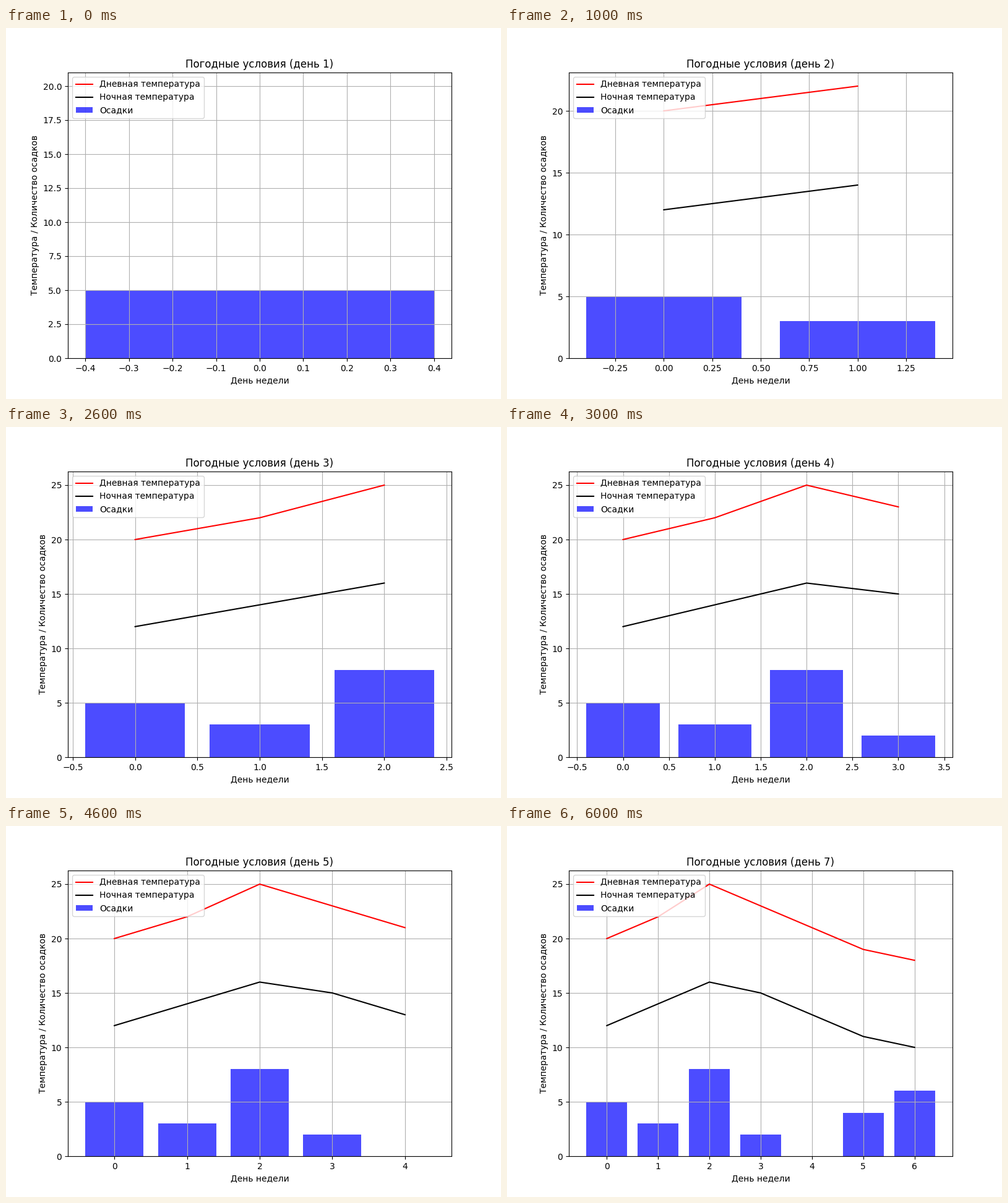
A matplotlib script that plays this animation: 800x600 px, repeating every 7 s.

```python
import matplotlib.pyplot as plt
from matplotlib.animation import FuncAnimation

DAY_TEMP = [20, 22, 25, 23, 21, 19, 18]
NIGHT_TEMP = [12, 14, 16, 15, 13, 11, 10]
RAIN = [5, 3, 8, 2, 0, 4, 6]

plt.rcParams["font.family"] = "DejaVu Sans"
fig, ax = plt.subplots(figsize=(8, 6), dpi=100)


def draw(frame):
    """Plot the week up to and including the given day."""
    count = frame + 1
    days = range(count)
    ax.clear()
    ax.plot(days, DAY_TEMP[:count], color="red", label="Дневная температура")
    ax.plot(days, NIGHT_TEMP[:count], color="black", label="Ночная температура")
    ax.bar(days, RAIN[:count], color="blue", alpha=0.7, label="Осадки")
    ax.set_xlabel("День недели")
    ax.set_ylabel("Температура / Количество осадков")
    ax.set_title(f"Погодные условия (день {count})")
    ax.legend(loc="upper left")
    ax.grid(True)


anim = FuncAnimation(fig, draw, frames=len(RAIN), init_func=lambda: draw(0),
                     interval=1000, repeat=True, repeat_delay=0)
plt.show()
```
